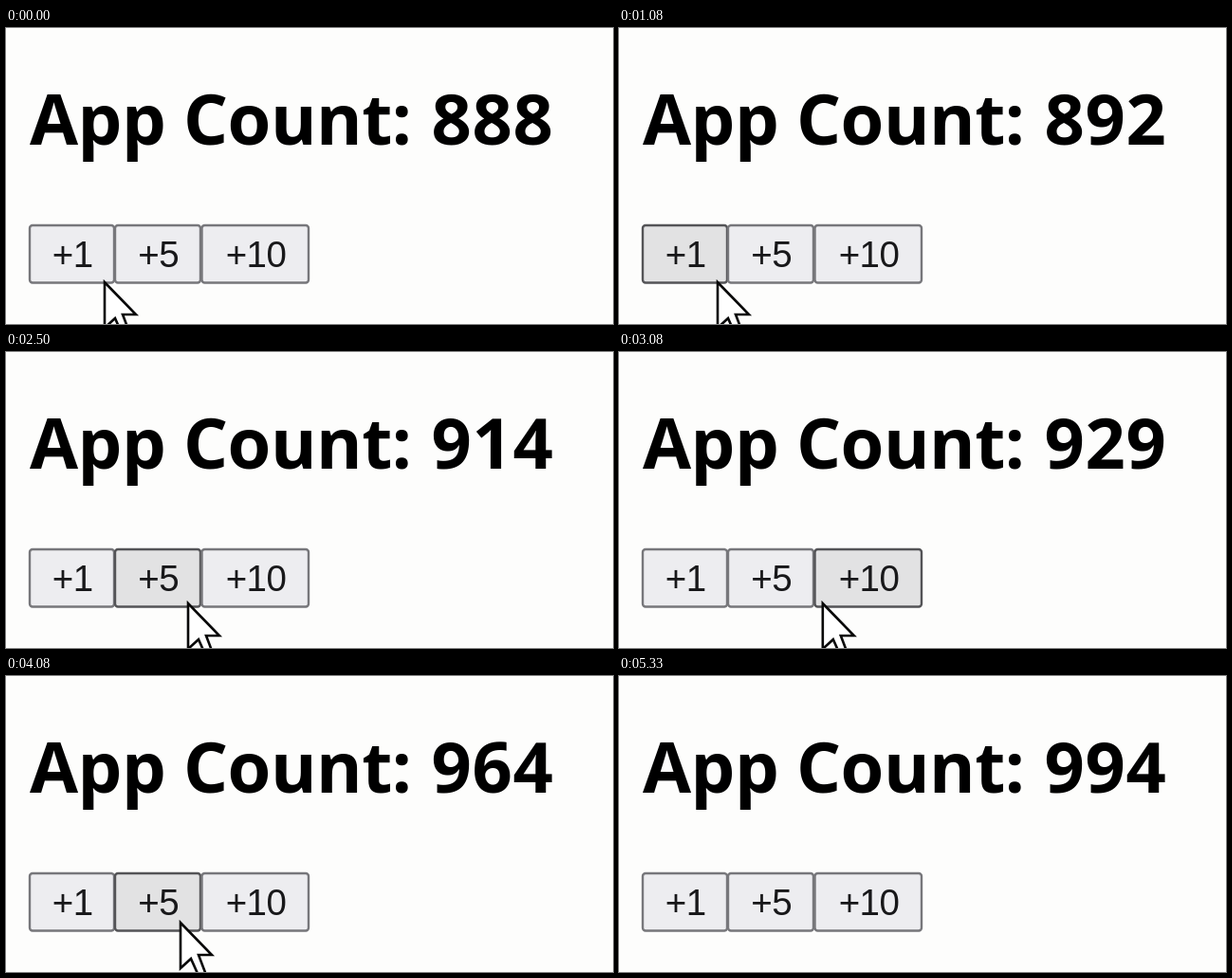
Animation, 640 px wide and 312 px high, one loop 5830 ms. Source, as an HTML page:

```html
<!DOCTYPE html>
<html lang="en">
<head>
<meta charset="utf-8">
<title>App Count</title>
<style>
html, body { margin: 0; width: 100%; height: 100%; overflow: hidden; background: #fdfdfc; }
svg { display: block; }
.title { font: bold 74px "Open Sans", "Noto Sans", sans-serif; letter-spacing: -.5px; }
#count { letter-spacing: .8px; }
.btn rect { fill: #ededf0; stroke: #77777b; stroke-width: 2.4; }
.btn text { font: 38.5px "Liberation Sans", Arial, sans-serif; letter-spacing: -.6px; fill: #18181a; text-anchor: middle; }
.btn.hover rect { fill: #e2e2e3; stroke: #545457; }
.btn.active rect { fill: #f5f5f6; stroke: #8d8d90; }
#cursor { fill: #fff; stroke: #080808; stroke-width: 2.6; }
</style>
</head>
<body>
<svg width="640" height="312" viewBox="0 0 640 312">
  <text class="title" x="25" y="123">App Count:</text>
  <text class="title" id="count" x="448.5" y="123"></text>
  <g id="buttons"></g>
  <path id="cursor" d="M0 0V48L11 38L20 58L27 55L19 34H33Z"/>
</svg>
<script>
const LOOP = 5830, STEP = 1000 / 12;
const $ = id => document.getElementById(id);

const buttons = [
  { add: 1, x: 25, w: 89 },
  { add: 5, x: 115, w: 90 },
  { add: 10, x: 206.5, w: 112.5 }
];
$('buttons').innerHTML = buttons.map(b => `<g class="btn">
  <rect x="${b.x}" y="208" width="${b.w}" height="60.5" rx="3"/>
  <text x="${b.x + b.w / 2 + 0.7}" y="252">+${b.add}</text></g>`).join('');
const nodes = [...$('buttons').children];

// The pointer visits each place and clicks `times` times, one click per `every` steps.
// `first` is the step of the first release; the mouse goes down one step before.
const visits = [
  { add: 1, x: 104, y: 268, first: 4, every: 3, times: 6 },
  { add: 5, x: 192, y: 265, first: 24, every: 2, times: 7 },
  { add: 10, x: 280, y: 265, first: 40, every: 2, times: 3 },
  { add: 5, x: 184, y: 260, first: 49, every: 2, times: 1 },
  { add: 10, x: 250, y: 256, first: 54, every: 2, times: 3 },
  { add: 0, x: 660, y: 325, first: 63, every: 2, times: 0 }
];

const clamp = (v, lo, hi) => Math.min(hi, Math.max(lo, v));
const clicksBy = (v, n) => clamp(Math.floor((n - v.first) / v.every) + 1, 0, v.times);
const countAt = n => visits.reduce((sum, v) => sum + v.add * clicksBy(v, n), 888);

function pointerAt(n) {
  let { x, y } = visits[0];
  for (let i = 1; i < visits.length; i++) {
    const from = visits[i - 1], to = visits[i];
    const leave = from.first + from.every * (from.times - 1);
    const k = clamp((n - leave) / (to.first - 1 - leave), 0, 1);
    const ease = k * k * (3 - 2 * k);
    x += (to.x - from.x) * ease;
    y += (to.y - from.y) * ease;
  }
  return { x, y };
}

function draw(ms) {
  const n = Math.floor((ms + 4) / STEP);
  const { x, y } = pointerAt(n);
  const down = countAt(n + 1) > countAt(n);
  $('count').textContent = countAt(n);
  $('cursor').setAttribute('transform', `translate(${x} ${y})`);
  buttons.forEach((b, i) => {
    const over = n > 0 && y < 270 && x >= b.x && x <= b.x + b.w;
    nodes[i].setAttribute('class', 'btn' + (over ? down ? ' active' : ' hover' : ''));
  });
}

const start = performance.now();
function tick() {
  draw((performance.now() - start) % LOOP);
  requestAnimationFrame(tick);
}
tick();
</script>
</body>
</html>
```
